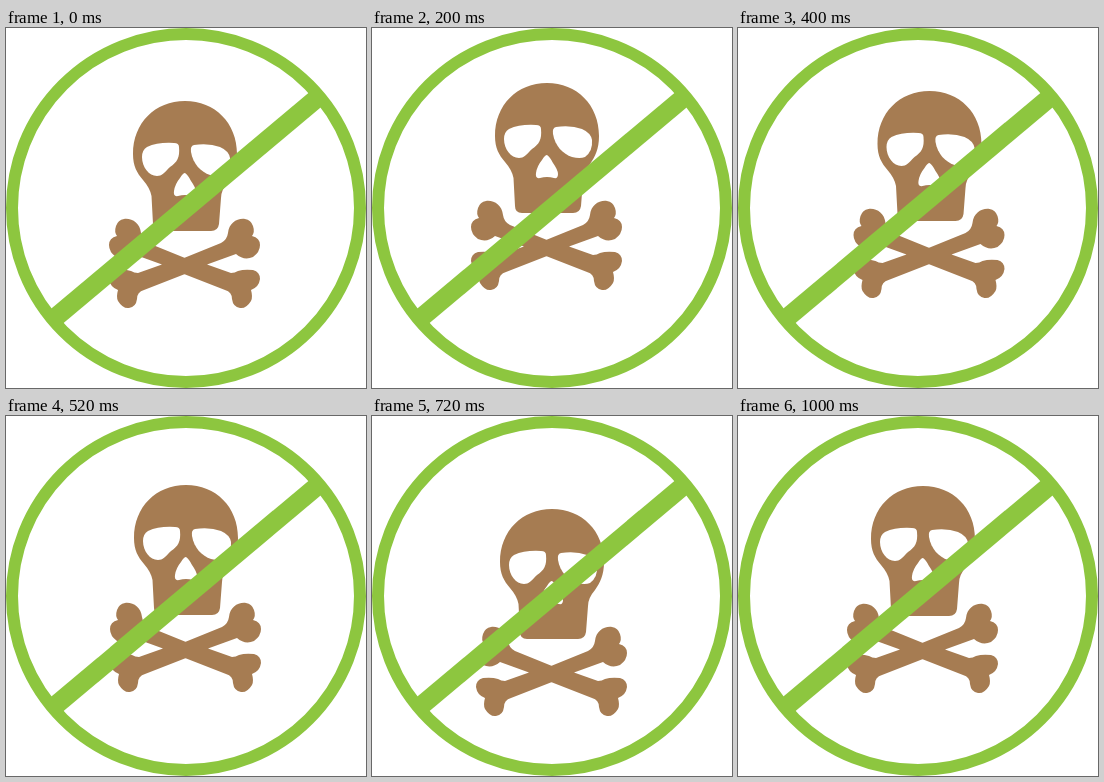
Write an HTML page that moves like this. It is 360x360 px and loops after 1.04 s.

```html
<!DOCTYPE html>
<html lang="en">
<head>
<meta charset="utf-8">
<title>No poison</title>
<style>
  html, body { margin: 0; width: 100%; height: 100%; overflow: hidden; background: #fff; }
  svg { display: block; width: 100vw; height: 100vh; }
</style>
</head>
<body>
<svg viewBox="0 0 360 360">
  <g id="skull" fill="#a67c52">
    <path d="M179 73C209 73 231 95 231 126C231 139 227 147 222 154Q215 162 215 170L213 196Q212 203 205 203H154Q147 203 147 196L145.500 168Q144 160 137 152C131 145 127 138 127 126C127 95 149 73 179 73Z"/>
    <g fill="#fff">
      <path d="M141 119Q152 114 168 115Q173 115 173 119C174 130 171 134 164 139C158 145 156 148 151 148C143 148 136 139 136 129Q136 122 141 119Z"/>
      <path d="M188 117Q203 115 214 119Q223 123 224 130Q225 141 217 147Q212 149 204 147C195 144 187 136 185 124Q184 118 188 117Z"/>
      <path d="M179 145Q182 147 185 153Q190 160 190 164Q190 169 186 168Q179 166 172 168Q167 169 168 163Q169 156 174 150Q177 145 179 145Z"/>
    </g>
    <path id="bones" d="M178 230L215 215Q221 212 222 205C223 195 231 190 239 191Q245 192 247 198Q249 204 246 208Q254 210 254 217Q254 224 247 229Q238 233 230 226L201 236.500L225 245Q229 245 232 243Q238 241 247 242Q254 244 254 251Q253 259 245 262Q247 269 245 273Q240 281 234 280Q227 279 226 271Q226 264 219 262L178 246Z"/>
    <use href="#bones" transform="translate(357) scale(-1 1)"/>
  </g>
  <g fill="none" stroke="#8dc63f">
    <circle cx="180" cy="180" r="174" stroke-width="12"/>
    <path d="M6 180H354" stroke-width="19" transform="rotate(-40 180 180)"/>
  </g>
</svg>
<script>
  const STEP = 40, STEPS = 26;
  // Knots of the closed drift path: [step, x, y]
  const knots = [
    [0, 0, 0], [2.7, -12, -9], [5, -4, -18], [8, 9, -16], [10, 12.5, -10], [13, 1, -4],
    [15.6, -11, 7], [18, 1, 20], [21, 13, 8], [23, 17, 0], [25, 6, -3]
  ];
  const skull = document.getElementById('skull');

  function knot(i) {
    const n = knots.length, lap = Math.floor(i / n);
    const [s, x, y] = knots[i - lap * n];
    return [s + lap * STEPS, x, y];
  }

  function slope(i, axis) {
    const a = knot(i - 1), b = knot(i + 1);
    return (b[axis] - a[axis]) / (b[0] - a[0]);
  }

  // Cubic Hermite curve through the knots
  function position(step, axis) {
    let i = 0;
    while (knot(i + 1)[0] <= step) i++;
    const a = knot(i), b = knot(i + 1), span = b[0] - a[0];
    const u = (step - a[0]) / span, v = 1 - u;
    return v * v * (1 + 2 * u) * a[axis] + u * u * (1 + 2 * v) * b[axis]
      + u * v * span * (v * slope(i, axis) - u * slope(i + 1, axis));
  }

  function draw(now) {
    const step = Math.floor(now / STEP) % STEPS;
    skull.setAttribute('transform', `translate(${position(step, 1)} ${position(step, 2)})`);
    requestAnimationFrame(draw);
  }
  draw(performance.now());
</script>
</body>
</html>
```
